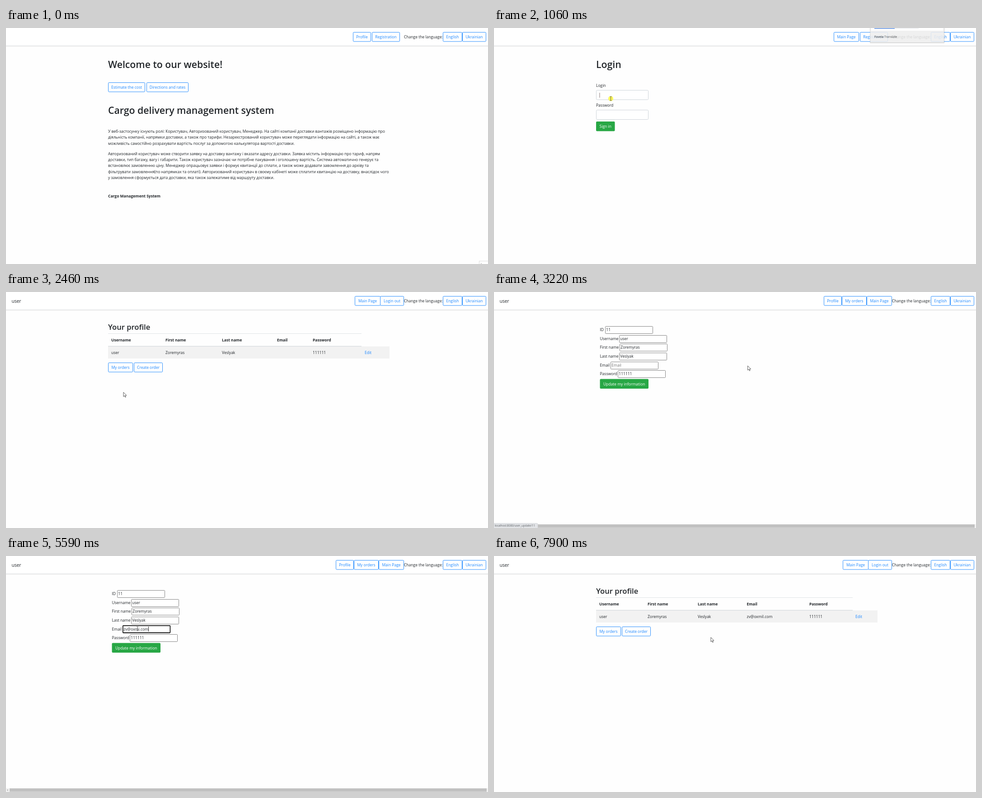
Animation of 1067 by 525 pixels, one loop 7.99 s. Source, as an HTML page:

```html
<!DOCTYPE html>
<html lang="en">
<head>
<meta charset="utf-8">
<title>Cargo delivery management system</title>
<style>
html, body { margin: 0; width: 100%; height: 100%; overflow: hidden; background: #fefefe; }
svg { display: block; width: 1067px; height: 525px; }
text { font: 8.5px "Open Sans", "Noto Sans", sans-serif; fill: #212529; white-space: pre; }
.h1 { font-size: 21.25px; font-weight: 600; }
.h2 { font-size: 16.6px; font-weight: 600; }
.bold { font-weight: 700; }
.user { font-size: 10.2px; }
.link { fill: #1a86ff; }
.mid { text-anchor: middle; }
.white { fill: #fff; }
.hint { fill: #757575; }
.small { font-size: 6.2px; fill: #5f6368; }
.brand { font-size: 6.6px; fill: #3c4043; }
.outline { fill: none; stroke: #2b8fff; }
.green { fill: #28a745; }
.control { fill: #fff; stroke: #ced4da; }
.field { fill: #fff; stroke: #858585; }
</style>
</head>
<body>
<svg id="stage" viewBox="0 0 1067 525"></svg>
<script>
const LOOP = 7990;
const FIRST = 'Zoremyras', LAST = 'Veslyak', MAIL = 'zv@oxmil.com';

const text = (x, y, s, cls = '', id = '') => `<text x="${x}" y="${y}" class="${cls}" id="${id}">${s}</text>`;
const rect = (x, y, w, h, attrs) => `<rect x="${x}" y="${y}" width="${w}" height="${h}" ${attrs}/>`;
const group = (id, ...parts) => `<g id="${id}">${parts.join('')}</g>`;
const button = (label, x1, x2, y = 9) =>
  rect(x1 + .5, y + .5, x2 - x1 - 1, 20.5, 'rx="1.8" class="outline"') +
  text((x1 + x2) / 2, y + 14, label, 'link mid');
const submit = (label, x1, x2, y) =>
  rect(x1, y, x2 - x1, 21.5, 'rx="2" class="green"') +
  text((x1 + x2) / 2, y + 14, label, 'white mid');
const lines = (y, rows) => rows.map((s, i) => text(226, y + i * 13.45, s)).join('');

const header = rect(0, 0, 1067, 39, 'fill="#fff"') + rect(0, 39, 1067, 1, 'fill="#e3e4e6"') +
  rect(0, 40, 1067, 1, 'fill="#ececec"') + rect(0, 41, 1067, 1, 'fill="#f8f8f8"') +
  text(881, 23, 'Change the language:') + button('English', 967, 1010) + button('Ukrainian', 1010, 1063);

const home = group('home',
  button('Profile', 768, 808), button('Registration', 810, 872),
  text(226, 89, 'Welcome to our website!', 'h1'),
  button('Estimate the cost', 226, 308, 121), button('Directions and rates', 311, 404, 121),
  text(226, 191, 'Cargo delivery management system', 'h1'),
  lines(233, [
    'У веб-застосунку існують ролі: Користувач, Авторизований користувач, Менеджер. На сайті компанії доставки вантажів розміщено інформацію про',
    'діяльність компанії, напрямки доставки, а також про тарифи. Незареєстрований користувач може переглядати інформацію на сайті, а також має',
    'можливість самостійно розрахувати вартість послуг за допомогою калькулятора вартості доставки.']),
  lines(282.5, [
    'Авторизований користувач може створити заявку на доставку вантажу і вказати адресу доставки. Заявка містить інформацію про тариф, напрям',
    'доставки, тип багажу, вагу і габарити. Також користувач зазначає чи потрібне пакування і оголошену вартість. Система автоматично генерує та',
    'встановлює замовленню ціну. Менеджер опрацьовує заявки і формує квитанції до сплати, а також може додавати завомлення до архіву та',
    'фільтрувати замовлення(по напрямках та оплаті). Авторизований користувач в своєму кабінеті може сплатити квитанцію на доставку, внаслідок чого',
    'у замовлення сформується дата доставки, яка також залежатиме від маршруту доставки.']),
  text(226, 376.5, 'Cargo Management System', 'bold'),
  group('corner', rect(1047.5, 518.5, 22, 10, 'fill="#fff" stroke="#dcdcdc"'),
    rect(1051, 523.5, 2, 1.5, 'fill="#bbb"')));

const login = group('login',
  button('Main Page', 752, 808), button('Registration', 810, 872),
  text(226, 89, 'Login', 'h1'),
  text(226, 131, 'Login'), rect(226.5, 138.5, 115, 21, 'rx="2" class="control"'),
  text(226, 174.5, 'Password'), rect(226.5, 182.5, 115, 21, 'rx="2" class="control"'),
  text(233, 152.5, 'user', '', 'loginName'), text(233, 196.5, '••••••', '', 'loginPass'),
  rect(233.5, 144, .8, 11, 'fill="#6b5555" id="loginCaret"'),
  submit('Sign in', 226, 267.5, 208));

const profile = (id, mail, lineEnd, columns) => group(id,
  text(12.5, 24, 'user', 'user'),
  button('Main Page', 772, 829), button('Login out', 828, 881),
  text(226, 84, 'Your profile', 'h2'),
  rect(226, 92, lineEnd - 226, 1, 'fill="#dee2e6"'),
  rect(226, 121, 623, 27, 'fill="#f2f2f2"'),
  rect(226, 120, lineEnd - 226, 1.2, 'fill="#d5d9dd"'),
  ...['Username', 'First name', 'Last name', 'Email', 'Password'].map((s, i) => text(columns[i], 110, s, 'bold')),
  ...['user', FIRST, LAST, mail, '111111', 'Edit'].map((s, i) => text(columns[i], 138, s, i == 5 ? 'link' : '')),
  button('My orders', 226, 281, 157), button('Create order', 283, 347, 157));

const fields = [['ID', 246, '11'], ['Username', 277, 'user'], ['First name', 278, FIRST],
  ['Last name', 277, LAST], ['Email', 258, ''], ['Password', 274, '111111']];
const fieldTop = i => Math.round(76 + i * 19.65);

const update = group('update',
  text(12.5, 24, 'user', 'user'),
  button('Profile', 730, 770), button('My orders', 770, 825), button('Main Page', 825, 881),
  ...fields.map(([label, x, value], i) => text(234.5, fieldTop(i) + 11.2, label) +
    rect(x + .5, fieldTop(i) + .5, 105, 16, 'rx="1" class="field"') + text(x + 2.3, fieldTop(i) + 11.2, value)),
  rect(258.8, 154.8, 104.6, 15.8, 'rx="1" fill="#fff" stroke="#101010" stroke-width="1.7" id="focus"'),
  rect(0, 157, 0, 11, 'fill="#7fb8f5" id="selection"'),
  text(260.3, 166.2, '', '', 'email'),
  rect(0, 157, .9, 11, 'fill="#111" id="caret"'),
  submit('Update my information', 234.5, 342, 193.5),
  rect(0, 516.5, 1067, 9, 'fill="#f1f1f1"'), rect(8, 517, 1056, 7.5, 'fill="#c1c1c1"'),
  '<path d="M4.5 519L2.8 520.8L4.5 522.6" fill="none" stroke="#777" stroke-width=".9"/>');

const popup = group('popup',
  rect(832, -10, 165.5, 44, 'rx="1.5" fill="#000" opacity=".12"'),
  rect(833, -10, 163, 42.5, 'fill="#fff" stroke="#c6c6c6" stroke-width=".8"'),
  rect(833.4, 6, 162.2, 26, 'fill="#eeeeee"'),
  rect(842, -.5, 98, 1.5, 'fill="#dfe3e8"'), rect(842, -.5, 45, 2, 'fill="#3f7de0"'),
  text(842, 21.7, '<tspan font-weight="600">Fovela</tspan> Translate', 'brand'));

const status = group('status',
  '<path d="M-1 514.5H95a2 2 0 0 1 2 2V526H-1Z" fill="#e2e4e7" stroke="#cfd1d4" stroke-width=".7"/>',
  text(1.5, 522.2, '', 'small', 'address'));

const pointer = group('pointer',
  '<circle id="halo" r="5.5" fill="#fbf54a" opacity=".9"/>',
  '<path id="arrow" d="M0 0V9.7L2.3 7.6L3.9 11.2L5.4 10.5L3.9 7.1H6.9Z" fill="#fff" stroke="#333" stroke-width=".8"/>',
  '<path id="beam" d="M-2 -4.5H-.5L0 -4L.5 -4.5H2M0 -4V4M-2 4.5H-.5L0 4L.5 4.5H2" fill="none" stroke="#444" stroke-width=".8"/>');

document.getElementById('stage').innerHTML = header + home + login +
  profile('before', '', 787, [233, 353, 478, 600, 679, 794]) + update +
  profile('after', MAIL, 794, [233, 340, 451, 559.5, 698, 800]) + popup + status + pointer;

const el = id => document.getElementById(id);
const show = (id, on) => el(id).style.display = on ? '' : 'none';
const within = (t, spans) => spans.some(([a, b]) => t >= a && t < b);

const scenes = [['home', 0], ['login', 520], ['before', 1740], ['update', 3100], ['after', 7600]];

// time, x, y
const path = [[40, 1058, 528], [380, 790, 20], [480, 790, 20], [830, 262, 151], [1000, 258.5, 157],
  [1240, 258.5, 157], [1560, 247, 216], [1760, 247, 216], [2400, 260, 223], [2500, 260, 223],
  [2880, 800, 133], [3060, 800, 133], [3220, 564, 164], [3300, 376, 178], [3640, 291, 162],
  [5880, 291, 162], [6080, 338, 146], [6260, 374, 172], [6540, 300, 163], [6620, 297, 163],
  [7270, 297, 163], [7440, 292, 203], [7620, 292, 203], [7890, 480, 181]];
const clicks = [[400, 490], [1000, 1150], [1600, 1710], [2960, 3050], [7480, 7570]];
const keyTimes = [3910, 4030, 4190, 4390, 4510, 4670, 4830, 5070, 5310, 5510, 5590];
const typo = MAIL.replace('l.', '.');

function pointerAt(t) {
  const next = path.findIndex(p => p[0] > t);
  if (next < 0) return path[path.length - 1].slice(1);
  if (next == 0) return path[0].slice(1);
  const [t0, x0, y0] = path[next - 1], [t1, x1, y1] = path[next];
  const k = (t - t0) / (t1 - t0);
  return [x0 + (x1 - x0) * k, y0 + (y1 - y0) * k];
}

function overInput(scene, x, y) {
  if (scene == 'login') return x > 226 && x < 342 && (y > 138 && y < 160 || y > 182 && y < 204);
  return scene == 'update' && fields.some(([, left], i) =>
    x > left && x < left + 106 && y > fieldTop(i) && y < fieldTop(i) + 17);
}

function drawEmail(t) {
  const email = el('email');
  const typed = t >= 7220 ? MAIL : typo.slice(0, keyTimes.filter(k => k <= t).length);
  email.textContent = typed || 'Email';
  email.setAttribute('class', typed ? '' : 'hint');
  show('focus', t >= 3640);
  show('caret', t >= 3640 && !within(t, [[6400, 6860]]));
  show('selection', within(t, [[6580, 6860]]));
  let end = 260.3 + (typed ? email.getComputedTextLength() : 0);
  if (t >= 6580) {
    const start = email.getStartPositionOfChar(6).x;
    end = email.getEndPositionOfChar(t >= 7220 ? 7 : 6).x;
    el('selection').setAttribute('x', start);
    el('selection').setAttribute('width', end - start);
  }
  el('caret').setAttribute('x', end);
}

function draw(t) {
  const scene = scenes.filter(s => s[1] <= t).pop()[0];
  scenes.forEach(([id]) => show(id, id == scene));
  show('corner', t < 80);
  show('loginName', t >= 1240);
  show('loginPass', t >= 1240);
  show('loginCaret', t < 1240);
  if (scene == 'update') drawEmail(t);

  show('popup', within(t, [[600, 1300]]));
  el('popup').setAttribute('opacity', t < 1000 ? 1 : Math.max(0, 1 - (t - 1000) / 500));

  show('status', within(t, [[360, 880], [2860, 3290]]));
  el('address').textContent = 'localhost:8080/' + (t < 1000 ? 'profile' : 'user_update/11');

  const [x, y] = pointerAt(t), beam = overInput(scene, x, y);
  show('pointer', t >= 40);
  el('pointer').setAttribute('transform', `translate(${x} ${y})`);
  show('arrow', !beam);
  show('beam', beam);
  show('halo', within(t, clicks));
}

function frame(now) {
  draw(now % LOOP);
  requestAnimationFrame(frame);
}
draw(0);
requestAnimationFrame(frame);
</script>
</body>
</html>
```
